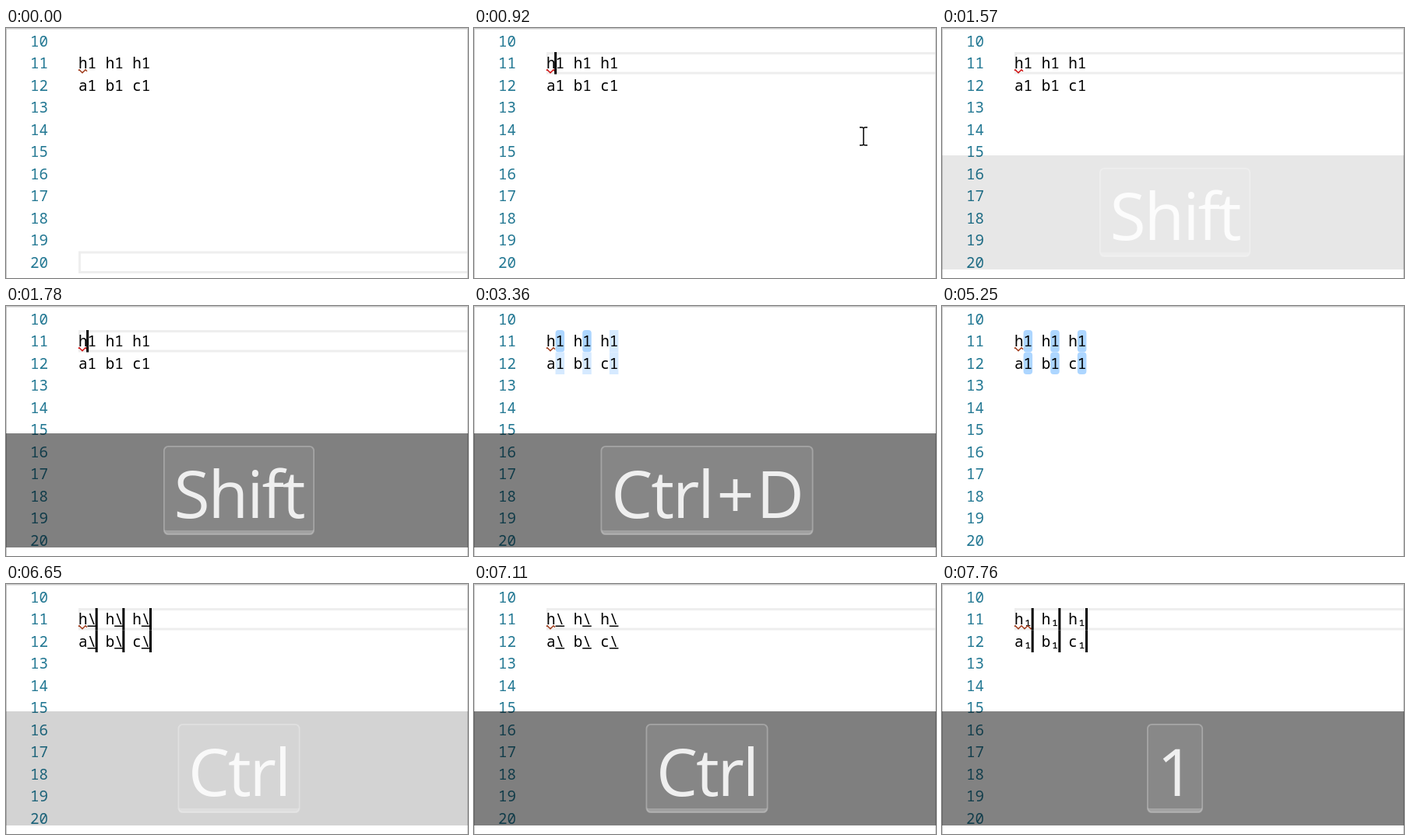
An HTML page that plays this animation: 593 by 322 pixels, repeating every 8 s.

```html
<!DOCTYPE html>
<html lang="en">
<head>
<meta charset="utf-8">
<style>
html, body { margin: 0; width: 100%; height: 100%; overflow: hidden; background: #fff; }
svg { display: block; }
.code { font: 19.25px "Noto Sans Mono", "DejaVu Sans Mono", monospace; white-space: pre; }
.key { font: 84px "Open Sans", "Noto Sans", sans-serif; letter-spacing: -2px; text-anchor: middle; }
</style>
</head>
<body>
<svg id="stage" width="593" height="322" viewBox="0 0 593 322"></svg>
<script>
const stage = document.getElementById('stage');
const LOOP = 8000, LEFT = 93, CHAR = 11.55, ROW = 28.5;
const CLICK = 640, TYPE = 6650, SUBSCRIPT = 7570;
const blinks = [CLICK, 1170, 1710, 2410, 2890, 3360, 3420, 5020, 5480, 5950, 6500, 7110, SUBSCRIPT];
const picks = [1940, 2890, 3420, 3840, 4160, 4470];
// start, end, text, box width, time the fade began (if it fades)
const labels = [
  [1570, 1940, 'Shift', 194, 1544],
  [1940, 2700, 'Shift+RightArrow', 670],
  [2700, 2890, 'Ctrl', 157],
  [2890, 5250, 'Ctrl+D', 273],
  [TYPE, SUBSCRIPT, 'Ctrl', 157, 6601],
  [SUBSCRIPT, LOOP, '1', 72, 7490]
];
const pointerPath = [[130, 592, 120], [580, 100, 33], [680, 102, 33], [920, 500, 139.5], [1000, 500, 139.5]];

const colX = col => LEFT + col * CHAR;
const rowY = line => 31 + (line - 11) * ROW;
const smooth = p => p * p * (3 - 2 * p);
const rect = (x, y, w, h, fill, r = 0) =>
  `<rect x="${x}" y="${y}" width="${w}" height="${h}" rx="${r}" fill="${fill}"/>`;
const text = (x, line, s, fill) =>
  `<text class="code" x="${x}" y="${rowY(line) + 21}" fill="${fill}">${s}</text>`;
const spot = i => ({ line: 11 + Math.floor(i / 3), col: 1 + i % 3 * 3 });

function currentLine(t) {
  if (t >= picks[0] && t < TYPE) return '';
  const y = rowY(t < CLICK ? 20 : 11);
  return `<rect x="94.5" y="${y + 1.5}" width="520" height="25.5" fill="none" stroke="#eee" stroke-width="3"/>`;
}

function selections(t) {
  if (t < picks[0] || t >= TYPE) return '';
  return picks.map((time, i) => {
    const { line, col } = spot(i), picked = t >= time;
    if (!picked && t < picks[1]) return '';
    return rect(colX(col), rowY(line), CHAR, ROW, picked ? '#add6ff' : '#d6eaff', picked ? 4 : 0);
  }).join('');
}

function squiggle(t) {
  const end = t >= SUBSCRIPT ? 115 : 104;
  let d = '';
  for (let x = LEFT; x <= end; x++) {
    const y = 53.8 + Math.abs(((x - 98) % 8 + 12) % 8 - 4);
    d += `${d ? 'L' : 'M'}${x} ${(111.6 - y - 0).toFixed(1)}`;
  }
  const color = t >= CLICK && t < picks[0] ? '#d01010' : '#a03c1c';
  return `<path d="${d}" fill="none" stroke="${color}" stroke-width="1.5"/>`;
}

function carets(t) {
  if (blinks.filter(b => b <= t).length % 2 === 0) return '';
  const caret = (line, col) => rect(colX(col) - 1.4, rowY(line), 3, ROW, '#000');
  if (t < picks[0]) return caret(11, 1);
  return picks.map((time, i) => {
    const { line, col } = spot(i);
    return t >= time ? caret(line, col + 1) : '';
  }).join('');
}

function editor(t) {
  const mark = t < TYPE ? '1' : t < SUBSCRIPT ? '\\' : '₁';
  let out = currentLine(t) + selections(t);
  for (let n = 10; n <= 20; n++) out += text(31, n, n, '#237893');
  ['hhh', 'abc'].forEach((row, i) => {
    out += text(LEFT, 11 + i, [...row].map(c => c + mark).join(' '), '#000');
  });
  if (mark === '\\') picks.forEach((_, i) => {
    const { line, col } = spot(i);
    out += rect(colX(col), rowY(line) + 22.5, CHAR, 1.5, '#000');
  });
  return out + squiggle(t) + carets(t);
}

function pointer(t) {
  const i = pointerPath.findIndex(p => p[0] > t);
  if (i < 1) return '';
  const [t0, x0, y0] = pointerPath[i - 1], [t1, x1, y1] = pointerPath[i];
  const p = smooth((t - t0) / (t1 - t0));
  return `<path transform="translate(${x0 + (x1 - x0) * p} ${y0 + (y1 - y0) * p})" fill="none" stroke="#000"
    stroke-width="1.5" d="M-5 -11.5H-2Q0 -11.5 0 -9.5Q0 -11.5 2 -11.5H5M0 -9.5V9.5M-5 11.5H-2Q0 11.5 0 9.5Q0 11.5 2 11.5H5"/>`;
}

function keyOverlay(t) {
  const label = labels.find(l => t >= l[0] && t < l[1]);
  if (!label) return '';
  const [start, , name, width, fadeStart = -LOOP] = label;
  const shown = start + Math.floor((t - start) / 70) * 70;
  const p = Math.min(1, (shown - fadeStart) / 260);
  const x = 299 - width / 2;
  const spaced = name.replace('+', '<tspan dx="5">+</tspan><tspan dx="5">') + (name.includes('+') ? '</tspan>' : '');
  return `<g opacity="${1 - (1 - p) ** 2}">
    ${rect(0, 164, 593, 147, 'rgba(0,0,0,.5)')}
    ${rect(x, 180, width, 115, 'rgba(255,255,255,.05)', 6)}
    <path d="M${x + 1} 288Q${x + 1} 289 ${x + 6} 289H${x + width - 6}Q${x + width - 1} 289 ${x + width - 1} 288
      Q${x + width - 1} 294 ${x + width - 7} 294H${x + 7}Q${x + 1} 294 ${x + 1} 288Z" fill="#fff" fill-opacity=".22"/>
    <rect x="${x + .9}" y="180.9" width="${width - 1.8}" height="113.2" rx="5.5" fill="none"
      stroke="#fff" stroke-opacity=".25" stroke-width="1.8"/>
    <text class="key" x="299" y="273" fill="#fff" fill-opacity=".87">${spaced}</text></g>`;
}

const frame = rect(0, 0, 593, 1.5, '#c8c8c8') + rect(0, 0, 1, 322, '#c8c8c8') + rect(592, 0, 1, 322, '#c8c8c8');
let last = '';

function draw() {
  const t = performance.now() % LOOP;
  const picture = editor(t) + frame + pointer(t) + keyOverlay(t);
  if (picture !== last) stage.innerHTML = last = picture;
  requestAnimationFrame(draw);
}
draw();
</script>
</body>
</html>
```
